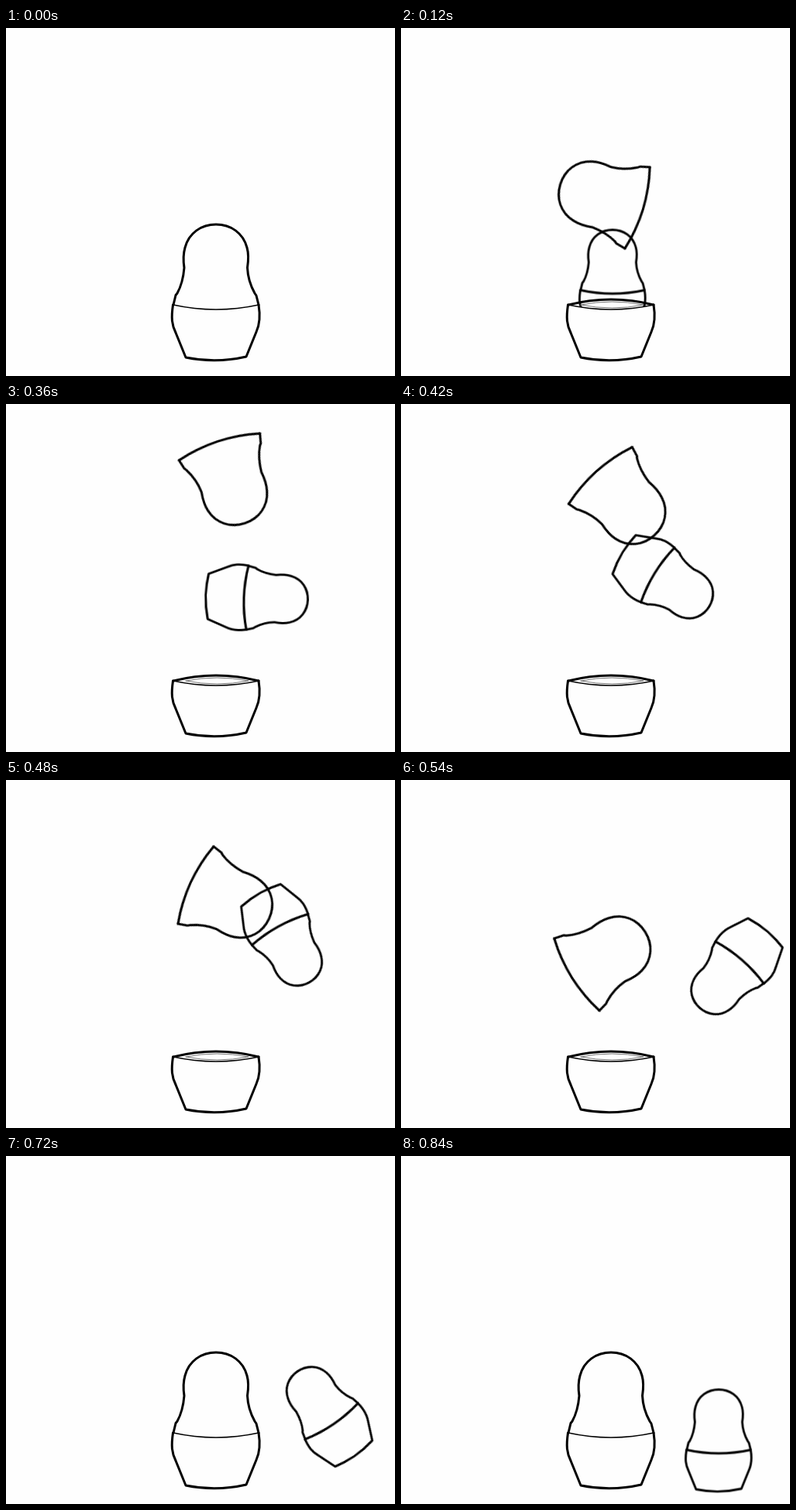
Write an HTML page without scripts that moves like this. It is 502 px wide and 450 px high and loops after 1.84 s.

```html
<!DOCTYPE html>
<html lang="en">
<head>
<meta charset="utf-8">
<title>Nesting doll</title>
<style>
  html, body { margin: 0; width: 100%; height: 100%; overflow: hidden; background: #fefefe; }
  svg { display: block; width: 502px; height: 450px; fill: none; stroke: #000; stroke-width: 3; stroke-linejoin: round; stroke-linecap: round; }
  .thin { stroke-width: 1.4; }
  .inner { stroke: #777; stroke-width: 1; }
  .small { stroke-width: 3.8; }

  .closed, .open, .lid, .out, .doll { animation: 1840ms step-end infinite; }
  .closed { animation-name: closed; }
  .open { animation-name: open; }
  .out { animation-name: out; }
  .lid { animation-name: lid; }
  .doll { animation-name: doll; }
  /* the tweens run at one step per 60 ms */
  .lid, .doll { animation-timing-function: steps(2, end); }

  @keyframes closed {
    0% { visibility: visible; }
    3.26% { visibility: hidden; }
    35.86%, 100% { visibility: visible; }
  }
  @keyframes open {
    0% { visibility: hidden; }
    3.26% { visibility: visible; }
    35.86%, 100% { visibility: hidden; }
  }
  @keyframes out {
    0% { visibility: hidden; }
    3.26%, 100% { visibility: visible; }
  }
  @keyframes lid {
    0% { transform: translate(271px, 306px) rotate(0deg); }
    6.52% { transform: translate(255.3px, 217.3px) rotate(-73deg); }
    13.04% { transform: translate(278.9px, 87.2px) rotate(-186deg); }
    19.56% { transform: translate(291.9px, 104.8px) rotate(-198.4deg); }
    26.08% { transform: translate(292.2px, 157.7px) rotate(-245.3deg); animation-timing-function: step-end; }
    29.34% { transform: translate(271px, 224px) rotate(-302deg); animation-timing-function: step-end; }
    32.6%, 100% { transform: translate(273.5px, 302.5px) rotate(-356deg); }
  }
  @keyframes doll {
    0% { transform: translate(271px, 343px) rotate(0deg); }
    6.52% { transform: translate(273px, 327px) rotate(0deg); }
    13.04% { transform: translate(291.8px, 302.8px) rotate(31.8deg); }
    19.56% { transform: translate(323.5px, 251px) rotate(92deg); }
    26.08% { transform: translate(359.3px, 204px) rotate(151deg); animation-timing-function: step-end; }
    29.34% { transform: translate(429px, 245px) rotate(221deg); animation-timing-function: step-end; }
    32.6% { transform: translate(416.8px, 298.1px) rotate(291.3deg); animation-timing-function: steps(4, end); }
    45.65%, 100% { transform: translate(410px, 368px) rotate(360deg); }
  }
</style>
</head>
<body>
<svg viewBox="0 0 502 450">
  <defs>
    <path id="dome" d="M216 358L219 345.500L221 343C226 334 229 322 230 310C228.500 300 229 291 231 284C236 265 252 254 271 254S306 265 311 284C313 291 313 300 311.500 310C312 322 316 334 321 343L323 346L326 358"/>
    <path id="pot" d="M215.500 358C213 375 214 384 219 394L232 426Q271 434 310 425L323 393C328 382 328 370 326 358"/>
    <path id="seam" d="M216 358Q271 370 326 358"/>
    <!-- all but the space behind the pot's front wall -->
    <clipPath id="front"><path d="M0 0H502V450H335V358H326Q271 370 216 358H0Z"/></clipPath>
  </defs>

  <g clip-path="url(#front)">
    <g class="out">
      <g class="doll">
        <g class="small" transform="scale(.75) translate(-271 -342)">
          <use href="#dome"/>
          <use href="#pot"/>
          <use href="#seam"/>
        </g>
      </g>
    </g>
  </g>

  <use href="#pot"/>
  <use href="#seam" class="thin"/>
  <use href="#dome" class="closed"/>

  <g class="open">
    <path d="M216 358Q271 344 326 358"/>
    <path class="inner" d="M232 358Q272 350 313 358Q272 366 232 358"/>
    <g class="lid">
      <g transform="translate(-271 -306)">
        <use href="#dome"/>
        <path d="M216 358Q271 373 326 358"/>
      </g>
    </g>
  </g>
</svg>
</body>
</html>
```
